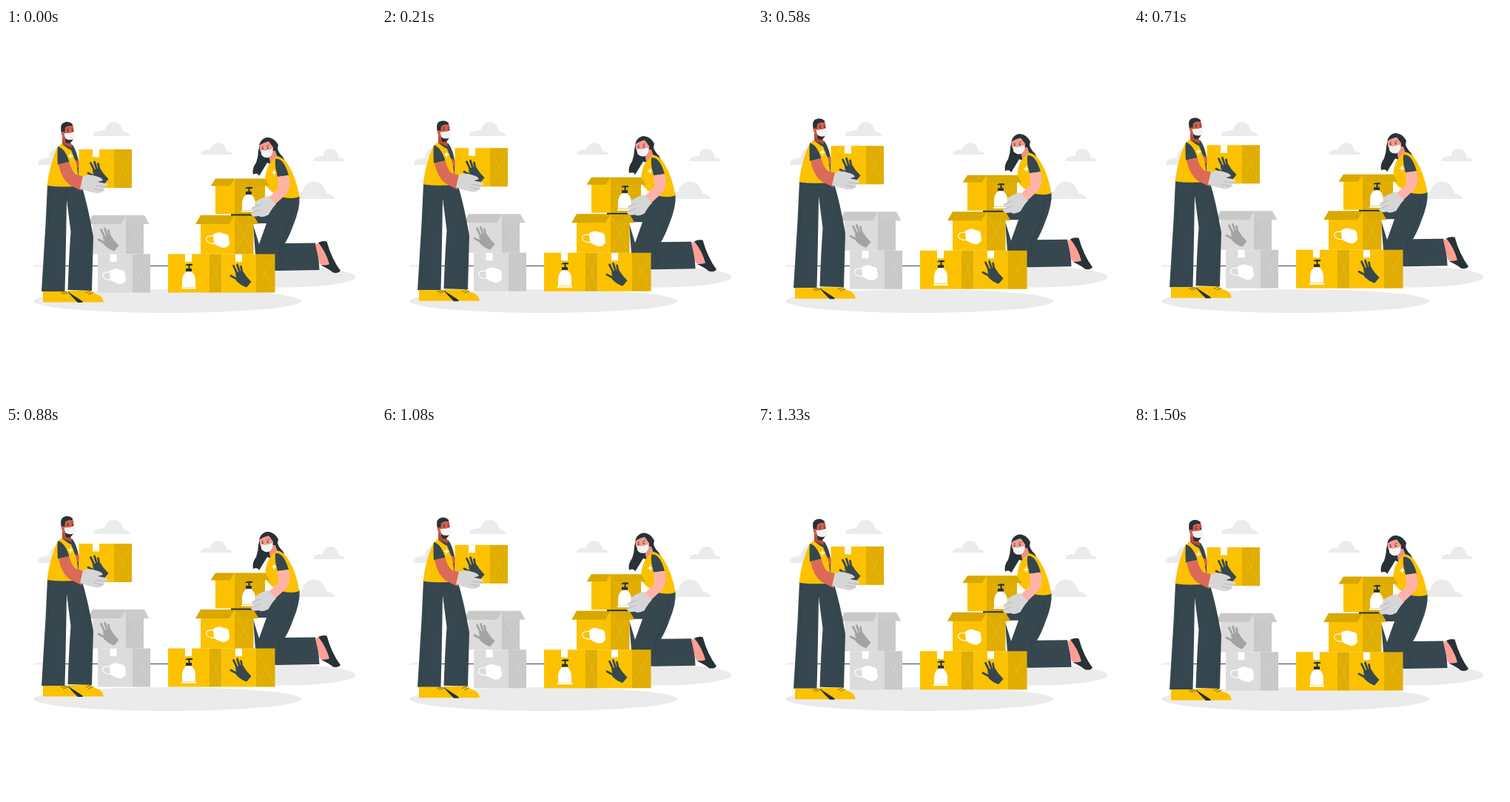
Animation of 500 by 500 pixels, one loop 1.54 s. Source, as an HTML page:

```html
<!DOCTYPE html>
<html lang="en">
<head>
<meta charset="utf-8">
<title>Box donation</title>
<style>
  html, body { margin: 0; height: 100%; overflow: hidden; background: #fff; }
  svg { display: block; width: 100vw; height: 100vh; }
  .dark { fill: #37474f; }
  .ink { fill: #263238; }
  .sun { fill: #fcc200; }
  .pale { fill: #ebebeb; }
  .glove { fill: #d6d6d6; }
  .white { fill: #fff; }
  .line { fill: none; stroke: #263238; stroke-width: .6; }
  .fold { fill: none; stroke: #fff; stroke-width: .5; opacity: .25; }
</style>
</head>
<body>
<svg viewBox="0 0 500 500">
  <defs>
    <path id="cloud" d="M0 19Q1 12 8 12Q12 10 15 12Q18 0 28 0Q37 0 40 11Q42 14 44 14Q49 15 50 19Z"/>
    <g id="hand" stroke-linecap="round">
      <path d="M-5-3L4-5Q7 1 15 9L9 16Q2 14-4 8Z"/>
      <path d="M-3-1L-8.500-12.500M0-3L-3.500-14M3-3L1.500-11.500M-1 7L-12 1" fill="none" stroke-width="2.800"/>
    </g>
    <g id="mask">
      <path d="M-6-7Q2-12 8-8Q14-8 15-4L16 6Q13 11 7 11Q-3 8-5 5Z" fill="#fff"/>
      <path d="M-5-5Q-17-6-15 1Q-12 6-4 5" fill="none" stroke="#fff" stroke-width="1.2"/>
    </g>
    <g id="soap">
      <path class="ink" d="M-4-15Q-2-17 5-16V-14H1.500V-10H4V-6H-4V-10H-.5V-14H-5Z"/>
      <path class="white" d="M-3-6H3Q9-2 9 7V15H-9V7Q-9-2-3-6Z"/>
      <path class="white" d="M-10 15.500H10V17.500H-10Z"/>
    </g>
  </defs>

  <g class="pale">
    <use href="#cloud" transform="translate(118 127)"/>
    <use href="#cloud" transform="translate(263 155) scale(.86 .85)"/>
    <use href="#cloud" transform="translate(415 163) scale(.86 .9)"/>
    <use href="#cloud" transform="translate(381 207.500) scale(1.27 1.240)"/>
    <use href="#cloud" transform="translate(43 162) scale(.95 1.21)"/>
    <ellipse cx="375" cy="336.500" rx="97" ry="14"/>
    <ellipse cx="218" cy="369" rx="181" ry="16"/>
  </g>
  <path d="M38 321.500H60" stroke="#ddd"/>
  <path d="M78 321.500H230" stroke="#37474f"/>

  <g id="float">
    <g id="woman">
      <path class="ink" d="M343 158Q346 148 354 148Q364 149 366 160Q368 169 374 174Q380 183 374 190L353 182Q347 192 342 200Q340 195 334 198Q332 190 338 182Q341 174 341 166Z"/>
      <path d="M354 166L364 166L368 178L357 182Z" fill="#f28f82"/>
      <path d="M343 156Q349 151 357 154L361 160Q362 171 354 175Q345 172 343 165Z" fill="#f79a8f"/>
      <path class="ink" d="M342 159Q347 155 355 153Q360 160 366 168L368 158Q362 147 352 148Q344 150 342 159Z"/>
      <path d="M345 165Q352 167 360 163Q362 171 355 175Q348 176 345 171Z" fill="#f3f3f3"/>
      <path class="line" d="M345 161L348 160M352 160L356 158" stroke-width="1"/>
      <path class="ink" d="M346 162h1.500v2h-1.500zM353 161h1.500v2h-1.500z"/>
      <path class="dark" d="M364 237L375 227H396.500Q398 243 388 267Q383 281 377 291L418 290.500Q423 308 423.500 327L367 328Q349 328 337 306L334 266L342 292L352 264L336 264L334 253H354Z"/>
      <path class="line" d="M388 240Q383 271 370 294Q367 305 374 320M380 291L374 295" opacity=".6"/>
      <path class="sun" d="M360 179L366 173Q376 175 382 186Q392 202 396.500 228Q387 232 371 228Q356 222 350 210Q350 188 360 179Z"/>
      <path class="dark" d="M364 177Q375 175 382 199L367 201Q363 188 364 177Z"/>
      <path d="M367 201L382 199Q386 214 379 224L364 238L355 229L368 217Z" fill="#ffb3a8"/>
      <path class="white" d="M361.500 192h1.500v2.500h2.500v1.500h-2.500v2.500h-1.500v-2.500h-2.500v-1.500h2.500z"/>
      <path d="M418 292L425 290L439 320Q432 323 424 319Z" fill="#ff9f94"/>
      <path class="ink" d="M422 290Q428 287 433.500 288.500Q440 312 452 328Q449 332 442 330.500Q437 326 425 320.500Q434 321 437 319Q432 302 422 290Z"/>
    </g>

    <g id="stacks"></g>

    <g id="reaching-glove">
      <path class="glove" d="M354 227L365 238Q360 243 353 253Q347 257 341 254Q334 256 331 252Q331 248 336 247Q330 247 332 243Q335 241 339 239Q335 239 337 235Q345 229 354 227Z"/>
      <path d="M332 250L344 245M333 243L344 239" stroke="#a9a9a9" stroke-width=".7"/>
    </g>

    <g id="man">
      <path class="dark" d="M56 212H102Q111 241 118 282Q117 318 116 355L83.500 354Q85 310 87.500 275L82 232Q81 300 79.500 356H48L53.500 265Z"/>
      <path class="line" d="M82 215Q80 231 82 241M102 222L114 278Q113 316 111 350M60 217Q57 265 53 349" opacity=".5"/>
      <path class="sun" d="M84 355H114L120 359Q131 361 132 370.500H101Q92 364 84 362ZM50 356H81L89 360Q98 362 103 370.500H50Z"/>
      <path class="ink" d="M83 356L103 369L104 371H97L89 363Z"/>
      <path class="line" d="M74 358L83 356M77 360L86 357M108 358L115 355M111 360L118 357" stroke-width="1.200"/>
      <path class="dark" d="M71 162L78 155L90 158Q96 167 98 180L99 212H68Z"/>
      <path d="M92 178L99 180V190L92 186Z" fill="#d35f4b"/>
      <path d="M76 146L87 151L89 162L76 157Z" fill="#b94b3a"/>
      <path class="sun" d="M75 156Q83 163 88 165L95 183L100 213Q78 216 55.500 213Q59 184 69 162Z"/>
      <path class="dark" d="M70 160Q80 163 85.500 181L70 184.500Q69 170 70 160Z"/>
      <path d="M71 184.500L85.500 181Q88 192 94 198L106 201L102 220L86 212Q75 204 71 184.500Z" fill="#db6a58"/>
      <path class="white" d="M86.500 169.500h1.500v2.500h2.500v1.500h-2.500v2.500h-1.500v-2.500h-2.500v-1.500h2.500z"/>
      <path d="M77 134Q85 127 91 133L92.500 145Q91 153 84 155Q78 153 76 145Z" fill="#d35f4b"/>
      <path class="ink" d="M75.500 144Q72 132 77 128.500Q84 124.500 90 130V132.500Q85 131 80 134.500L79 143L77 145ZM79 147L91 150Q87 158 81 155Z"/>
      <ellipse cx="77" cy="143" rx="2" ry="3" fill="#d35f4b"/>
      <path d="M78.500 142Q85 143 92 140Q95 147 92.500 150Q85 153 80 149Z" fill="#f3f3f3"/>
      <path class="line" d="M82 137L85 136M88.500 136L91 136" stroke-width="1"/>
      <path class="ink" d="M83 138h1.500v2h-1.500zM89 138h1.500v2h-1.500z"/>
    </g>

    <g id="carried"></g>
    <g id="holding-glove">
      <path d="M94 198L106 201L102 219L91 214Z" fill="#db6a58"/>
      <path class="glove" d="M104 200Q114 197 121 200Q130 202 131 206L124 208L134 210Q139 211 137 214L132 216Q135 219 130 221Q127 224 121 223Q110 221 100 217Z"/>
      <path d="M121 213L135 215M119 217L131 220" stroke="#a9a9a9" stroke-width=".7"/>
    </g>
  </g>
</svg>
<script>
  const yellow = { front: '#fcc200', side: '#e0ad00', flap: '#d9a800', dark: '#dcab00', icon: '#37474f' };
  const gray = { front: '#dcdcdc', side: '#c9c9c9', flap: '#c9c9c9', dark: '#cccccc', icon: '#a3a3a3' };
  const byId = id => document.getElementById(id);

  const shape = (d, fill) => `<path d="${d}" fill="${fill}"/>`;
  const icon = (name, x, y, color = '') =>
    `<use href="#${name}" x="${x}" y="${y}" fill="${color}" stroke="${name === 'hand' ? color : 'none'}"/>`;

  // x, y: top left; mid: front/side edge; right, bottom: far corner
  function box(c, x, y, mid, right, bottom) {
    return shape(`M${x} ${y}H${mid}V${bottom}H${x}Z`, c.front) +
      shape(`M${mid} ${y}H${right}V${bottom}H${mid}Z`, c.side) +
      `<path class="fold" d="M${mid + 2} ${y + 4}L${right - 2} ${bottom - 4}M${right - 2} ${y + 4}L${mid + 2} ${bottom - 4}"/>`;
  }
  const tape = (x, y) => shape(`M${x} ${y}h9v11l-2 -1l-2 1l-2 -1l-3 1z`, '#fff');
  const flaps = (c, x, y, mid, right, out, drop) =>
    shape(`M${x} ${y}H${mid}l${-out} ${drop}H${x - out}Z`, c.flap) +
    shape(`M${mid} ${y}H${right}l${out} ${drop}H${mid + out}Z`, c.dark);

  byId('stacks').innerHTML =
    box(gray, 124, 305.5, 171, 195, 357.5) + tape(140.5, 305.5) + icon('mask', 146, 335) +
    box(gray, 117, 254, 162, 186, 305.5) + flaps(gray, 117, 253, 162, 187, 6.5, 12) +
    icon('hand', 137, 285, gray.icon) +
    box(yellow, 219, 305.5, 275, 291.5, 357.5) + tape(242, 305.5) + icon('soap', 247, 335) +
    box(yellow, 291.5, 305.5, 338, 363.5, 357.5) + tape(310, 305.5) + icon('hand', 316, 334, yellow.icon) +
    box(yellow, 263, 254, 309, 334.5, 305.5) + flaps(yellow, 263, 253, 309, 334.5, 7, 12) +
    icon('mask', 286, 286) +
    shape('M304 251H340V253.500H304Z', '#263238') +
    box(yellow, 283, 204, 309, 350, 251.5) + flaps(yellow, 283, 203.5, 309, 350, 6.5, 10) +
    icon('soap', 328, 231);

  byId('carried').innerHTML =
    box(yellow, 98.5, 164, 146, 170, 216) + tape(117, 164) + icon('hand', 123, 195, yellow.icon);

  const LOOP = 1540, HALF = 750, RISE = 6;
  const group = byId('float');
  const start = performance.now();

  function draw() {
    const t = (performance.now() - start) % LOOP;
    const lift = RISE * Math.max(0, 1 - Math.abs(t - HALF) / HALF);
    group.setAttribute('transform', `translate(0 ${-lift})`);
    requestAnimationFrame(draw);
  }
  draw();
</script>
</body>
</html>
```
